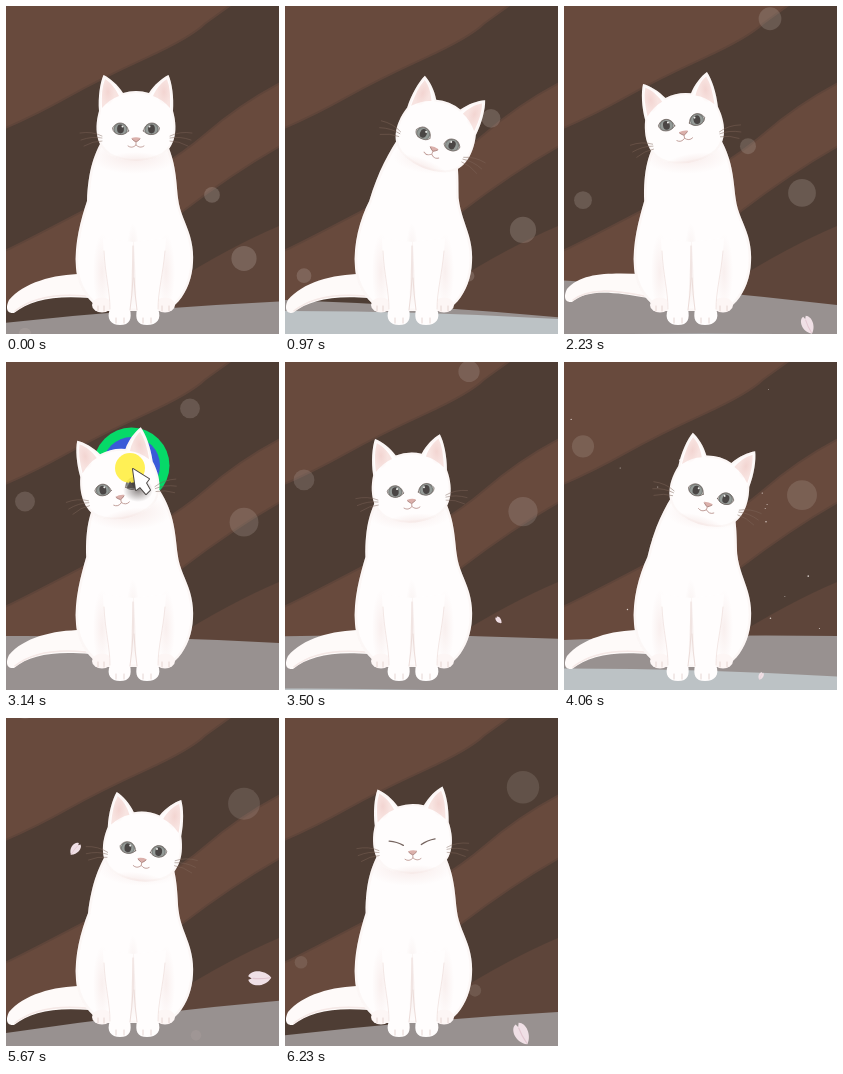
Animation of 273 by 328 pixels, one loop 6.3 s. Source, as an HTML page with a canvas:

```html
<!DOCTYPE html>
<html lang="en">
<head>
<meta charset="utf-8">
<title>White cat</title>
<style>
html, body { margin: 0; width: 100%; height: 100%; overflow: hidden; background: #684a3d; }
canvas { display: block; width: 273px; height: 328px; }
</style>
</head>
<body>
<canvas width="273" height="328"></canvas>
<script>
const ctx = document.querySelector('canvas').getContext('2d');
const W = 273, H = 328, LOOP = 6300;

// Head turning points: time, sideways lean, drop
const turns = [
  [0, 0, 0], [970, 40, 13], [2230, -19, 3], [3140, -27, 3],
  [4060, 30, 11], [5110, 31, 17], [6230, -5, 1]
];
// Rising bubbles: x, y at time zero, speed
const bubbles = [
  [238, 252.5, .0294], [206, 189, .079], [19, 328, .06],
  [184, 370, .103], [190, 771, .08], [16, 805, .09]
];
// Falling petals: time, x, y, size
const petals = [
  [2230, 244, 319, 19], [4060, 197, 314, 8], [5110, 86, 75, 14],
  [5110, 257, 287, 7], [6230, 237, 316, 23]
];

const clamp = (v, lo = 0, hi = 1) => Math.min(hi, Math.max(lo, v));
const smooth = u => u * u * (3 - 2 * u);
const bump = (t, mid, width) => Math.exp(-(((t - mid) / width) ** 2));
const wave = (t, peak, cycles = 1) => Math.cos(2 * Math.PI * cycles * (t - peak) / LOOP);
const swell = (t, peak, power) => ((1 + wave(t, peak)) / 2) ** power;
const hash = n => { const v = Math.sin(n * 127.1) * 43758.5453; return v - Math.floor(v); };

function headAt(t) {
  const i = clamp(turns.findIndex(k => k[0] > t), 1, turns.length - 1);
  const [a, b] = t > turns.at(-1)[0] ? [turns.at(-1), turns.at(-1)] : [turns[i - 1], turns[i]];
  const u = smooth(clamp((t - a[0]) / (b[0] - a[0] || 1)));
  return { lean: a[1] + (b[1] - a[1]) * u, drop: a[2] + (b[2] - a[2]) * u };
}

function fill(d, color) {
  ctx.fillStyle = color;
  ctx.fill(new Path2D(d));
}

function line(d, color, width = 1) {
  ctx.strokeStyle = color;
  ctx.lineWidth = width;
  ctx.stroke(new Path2D(d));
}

function oval(x, y, rx, ry, color) {
  ctx.fillStyle = color;
  ctx.beginPath();
  ctx.ellipse(x, y, rx, ry, 0, 0, 7);
  ctx.fill();
}

const disc = (x, y, r, color) => oval(x, y, r, r, color);

function soft(x, y, rx, ry, rgb, alpha) {
  ctx.save();
  ctx.translate(x, y);
  ctx.scale(rx, ry);
  const g = ctx.createRadialGradient(0, 0, 0, 0, 0, 1);
  g.addColorStop(0, `rgba(${rgb},${alpha})`);
  g.addColorStop(1, `rgba(${rgb},0)`);
  disc(0, 0, 1, g);
  ctx.restore();
}

function mirrored(draw) {
  for (const side of [-1, 1]) {
    ctx.save();
    ctx.scale(side, 1);
    draw();
    ctx.restore();
  }
}

function wall() {
  ctx.fillStyle = '#684a3d';
  ctx.fillRect(0, 0, W, H);
  const bands = [
    'M-5 125 Q30 110 62 92 T140 53 T200 18 L232 -5 H278 V74 Q235 96 198 128 T75 205 T-5 245Z',
    'M278 139 Q230 166 176 207 T60 275 L-5 302 V328 H278Z'
  ];
  for (const d of bands) {
    line(d, 'rgba(78,61,52,.35)', 4);
    fill(d, '#4e3d34');
  }
  fill('M278 218 Q225 240 165 278 V328 H278Z', '#5e453a');
}

function floor(left, right, color) {
  fill(`M0 ${left} Q136 ${(left + right) / 2 - 4} ${W} ${right} V${H} H0Z`, color);
}

function drawFloor(t) {
  floor(274 + 44 * swell(t, -250, 2), 274 + 38 * swell(t, 1200, 1.5), '#989190');
  floor(322 - 20 * wave(t, 1250, 2), 326 - 18 * wave(t, 1350, 2), '#bcc2c5');
}

function drawBubbles(t) {
  for (const [x, y0, speed] of bubbles) {
    const y = y0 - speed * t;
    disc(x, y, Math.max(0, 1.5 + .28 / speed + .02 * (330 - y)), `rgba(190,176,168,${.28 - .1 * t / LOOP})`);
  }
}

function drawSnow(t) {
  const alpha = .75 * clamp((t - 3650) / 300) * clamp((4600 - t) / 350);
  for (let i = 1; i <= 22; i++)
    disc(hash(i) * W, hash(i + 40) * 300 + (t - 4060) * .015, .4 + hash(i + 80) * .5, `rgba(255,250,246,${alpha})`);
}

function drawPetals(t) {
  for (const [at, x, y, size] of petals) {
    const dt = t - at;
    if (Math.abs(dt) > 700) continue;
    ctx.save();
    ctx.translate(x - .03 * dt, y + .1 * dt);
    ctx.rotate(Math.sin(x) * .5 + dt * .002);
    ctx.scale(size / 20, size / 20);
    fill('M0 10 C-9 4 -7 -9 -1 -10 L0 -7 L2 -10 C8 -7 7 5 0 10Z', '#f0e0e6');
    line('M0 9 Q-1 1 0 -6', '#e2c6d0');
    ctx.restore();
  }
}

function drawTail(lift) {
  const y = 302 - lift;
  fill(`M82 268 C50 267 18 ${y - 26} 3 ${y - 8} C-1 ${y} 1 ${y + 6} 8 ${y + 5}
    C24 ${y - 8} 48 ${289 - lift * .3} 84 292Z`, '#fefaf9');
  line(`M9 ${y + 3} C24 ${y - 9} 48 ${287 - lift * .3} 80 290`, '#f5e8e6', 1.5);
}

function drawBody(lean) {
  const s = Math.max(-4, lean * .4);
  const shape = `M${100 + s} 128 C${88 + s} 146 ${82 + s * .7} 165 ${81 + s * .2} 195
    C75 213 68 238 70 262 C72 286 86 296 95 305 H161 C185 291 192 257 184 230
    C180 216 ${174 + s * .1} 208 ${172 + s * .1} 192 C${170 + s * .2} 172 ${170 + s * .3} 152 ${156 + s * .6} 128Z`;
  ctx.save();
  fill(shape, '#fffdfd');
  ctx.clip(new Path2D(shape));
  line(shape, 'rgba(246,230,228,.3)', 5);
  soft(128 + s * 1.5, 150, 44, 18, '240,217,214', .5);
  soft(127, 262, 7, 45, '236,218,215', .5);
  soft(96, 266, 9, 38, '244,228,226', .55);
  soft(160, 266, 9, 38, '244,228,226', .55);
  ctx.restore();

  oval(96, 299, 10, 7.5, '#fdf6f5');
  oval(159, 299, 10, 7.5, '#fdf6f5');
  fill('M97 232 C98 265 103 285 104 303 C100 313 105 319 114 319 C124 319 126 313 124 303 L127 236Z', '#fffdfd');
  fill('M160 232 C158 265 153 285 152 303 C156 313 151 319 141 319 C131 319 129 313 131 303 L128 236Z', '#fffdfd');
  line('M98 245 C99 268 104 285 104 303 M159 245 C157 268 152 285 152 303', 'rgba(236,217,214,.6)');
  line('M127 240 V272 Q126 290 124 304 M128 272 Q129 290 131 304', '#ecdcd9');
  for (const x of [110, 118, 137, 145]) line(`M${x} 312 V317`, '#e4d2cf', .9);
  for (const x of [92, 98, 156, 163]) line(`M${x} 300 V305`, '#e4d2cf', .9);
}

function drawEye(open) {
  if (open < .12) {
    line('M9 3 Q15 -1 23 -2', '#75645f', 1.3);
    return;
  }
  const top = -8 * open, bottom = 7 * open;
  const shape = `M7.5 2 C9 ${top} 19 ${top - 2} 23.5 -1 C23 ${bottom} 12 ${bottom + 2} 7.5 2Z`;
  ctx.save();
  ctx.clip(new Path2D(shape));
  disc(15.5, 0, 10, '#d3d1cd');
  disc(15.5, 0, 7, '#7c817e');
  disc(15.5, .5, 5.8, '#949a97');
  oval(15.5, 0, 3.4, 4.4, '#4a4645');
  disc(13.5, -2.5, 1, '#efefed');
  ctx.restore();
  line(shape, 'rgba(112,100,96,.8)', .9);
}

function drawHead({ lean, drop }, t) {
  const open = .88 * clamp((6020 - t) / 150);
  const look = 1 - 9 * bump(t, 2230, 500);
  ctx.save();
  ctx.translate(130 + lean, 69 + drop);
  ctx.rotate(clamp(lean * .55, -12, 22) * Math.PI / 180);

  const shape = `M-32.5 0 C-36 8 -38 22 -37 36 C-43 57 -38 76 -22 82 Q0 90 22 82
    C38 76 43 57 37 36 C38 22 36 8 32.5 0 C26 3 18 10 13 18 Q0 14 -13 18 C-18 10 -26 3 -32.5 0Z`;
  fill(shape, '#fffdfd');
  ctx.save();
  ctx.clip(new Path2D(shape));
  line(shape, 'rgba(246,230,228,.3)', 4);
  soft(0, 88, 32, 11, '240,217,214', .55);
  ctx.restore();

  mirrored(() => {
    fill('M31 4 C25 8 20 14 17 21 Q26 24 34 33 Q35 15 31 4Z', '#f8e4e1');
    soft(28, 17, 7, 13, '235,190,186', .4);
    line('M34 61 Q44 56 56 58 M34 63 Q44 61 55 65 M34 66 Q43 66 52 71', 'rgba(125,100,88,.7)', .65);
  });

  ctx.translate(lean * .08, 53 + look);
  mirrored(() => drawEye(open));
  fill('M-4.5 9 Q0 7.5 4.5 9 Q3 12 0 13 Q-3 12 -4.5 9Z', '#dbb0ab');
  line('M-4 10 Q-2 12 0 13 Q2 12 4 10', '#a67f7a', .8);
  line('M0 13 V16 Q-4 20 -8 17 M0 16 Q4 20 8 17', '#c09d98', .9);
  ctx.restore();
}

const tapAlpha = t => clamp((t - 3000) / 60) * clamp((3300 - t) / 60);

function drawRings(t) {
  const scale = smooth(clamp((t - 2960) / 170));
  ctx.globalAlpha = tapAlpha(t);
  disc(125.5, 103.5, 38 * scale, '#06d968');
  disc(125.5, 103.5, 28.5 * scale, '#3a5bd8');
  ctx.globalAlpha = 1;
}

function drawPointer(t) {
  ctx.globalAlpha = tapAlpha(t);
  soft(132, 128, 15, 12, '70,62,60', .6);
  disc(124, 106, 15, 'rgba(255,238,66,.9)');
  const arrow = 'M127 107 L143 117 L140 121 L144 128 L140 132 L134 125 L130 128Z';
  line(arrow, '#4b4745', 2);
  fill(arrow, '#ffffff');
  fill('M121 126 L124 119 L128 126Z', '#55504d');
  ctx.globalAlpha = 1;
}

function draw(t) {
  const head = headAt(t);
  wall();
  drawFloor(t);
  drawBubbles(t);
  drawSnow(t);
  drawRings(t);
  drawTail(11 * bump(t, 2230, 600));
  drawBody(head.lean);
  drawHead(head, t);
  drawPointer(t);
  drawPetals(t);
}

ctx.lineCap = ctx.lineJoin = 'round';
const start = performance.now();
function tick() {
  draw((performance.now() - start) % LOOP);
  requestAnimationFrame(tick);
}
tick();
</script>
</body>
</html>
```
